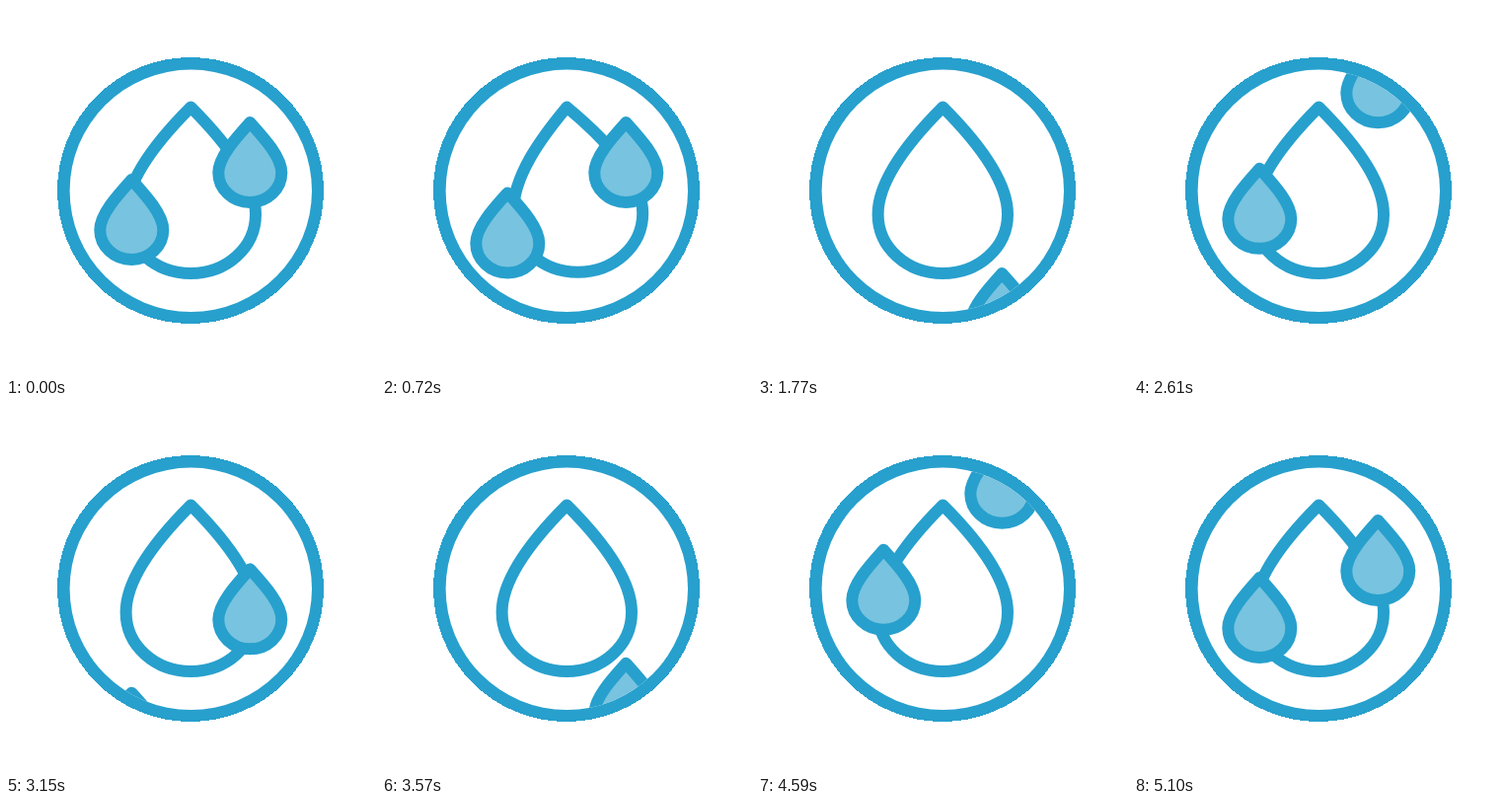
These frames come from a looping animation (375 by 375 pixels, 5340 ms). An HTML page:

```html
<!DOCTYPE html>
<html lang="en">
<head>
<meta charset="utf-8">
<title>Water drops</title>
<style>
  html, body { margin: 0; width: 100%; height: 100%; overflow: hidden; background: #fff; }
  svg { display: block; width: 100vw; height: 100vh; }
  .line { fill: none; stroke: #27a0cd; stroke-width: 12; stroke-linejoin: round; }
  .full { fill: #78c3df; }
  .disc { fill: #27a0cd; shape-rendering: crispEdges; }
</style>
</head>
<body>
<svg viewBox="0 0 375 375">
  <defs>
    <clipPath id="inside"><circle cx="187.3" cy="187.3" r="122.7"/></clipPath>
    <path id="drop" d="M0 0C14 15.5 32 35 32 51C32 67.5 17.7 81 0 81S-32 67.5 -32 51C-32 35 -14 15.5 0 0Z"/>
  </defs>
  <circle class="disc" cx="187" cy="187" r="135"/>
  <circle cx="187.3" cy="187.3" r="122.7" fill="#fff"/>
  <g clip-path="url(#inside)">
    <path id="main" class="line"/>
    <use id="left" href="#drop" class="line full"/>
    <use id="right" href="#drop" class="line full"/>
  </g>
</svg>
<script>
const LOOP = 5340, STEP = 30;
const el = id => document.getElementById(id);
const main = el('main'), left = el('left'), right = el('right');

const smooth = u => u * u * (3 - 2 * u);
const inOut = u => u < 0.5 ? 0.5 * (2 * u) ** 2.3 : 1 - 0.5 * (2 - 2 * u) ** 2.3;

// Each fall: start time, end time, first offset, last offset, easing
const leftFalls = [
  [420, 1620, 0, 132, inOut],
  [1701, 3366, -200, 132, smooth],
  [3750, 4860, -190, 0, smooth]
];
const rightFalls = [
  [960, 2160, 0, 188, inOut],
  [2121, 4001, -135, 188, smooth],
  [4178, 5100, -135, 0, smooth]
];

const progress = (t, a, b) => Math.min(1, Math.max(0, (t - a) / (b - a)));

function offset(falls, t) {
  let y = 0;
  for (const [a, b, from, to, ease] of falls)
    if (t >= a) y = from + (to - from) * ease(progress(t, a, b));
  return y;
}

// The tip stays put while the body leans to the right by s
function mainPath(s) {
  const cx = 187.3, top = 102.5;
  const dx = cx + 17 * s, dy = -2 * s, turn = s * 8 * Math.PI / 180;
  const c = Math.cos(turn), n = Math.sin(turn);
  const tip = x => `${cx + x * c + 30 * n} ${top + 30 * c - x * n}`;
  const at = (x, y) => `${dx + x} ${dy + y}`;
  return `M${cx} ${top}C${tip(30)} ${at(65.7, 174)} ${at(65.7, 211)}` +
    `C${at(65.7, 245)} ${at(36, 271)} ${at(0, 271)}` +
    `C${at(-36, 271)} ${at(-65.7, 245)} ${at(-65.7, 211)}` +
    `C${at(-65.7, 174)} ${tip(-30)} ${cx} ${top}Z`;
}

function draw(now) {
  const t = Math.floor((now % LOOP) / STEP) * STEP;
  const lean = 1.32 * (smooth(progress(t, 420, 1020)) - smooth(progress(t, 1020, 1480)));
  main.setAttribute('d', mainPath(lean));
  left.setAttribute('transform', `translate(127.3 ${176 + offset(leftFalls, t)})`);
  right.setAttribute('transform', `translate(247.3 ${118 + offset(rightFalls, t)})`);
}

const begin = performance.now();
function tick() {
  draw(performance.now() - begin);
  requestAnimationFrame(tick);
}
tick();
</script>
</body>
</html>
```
